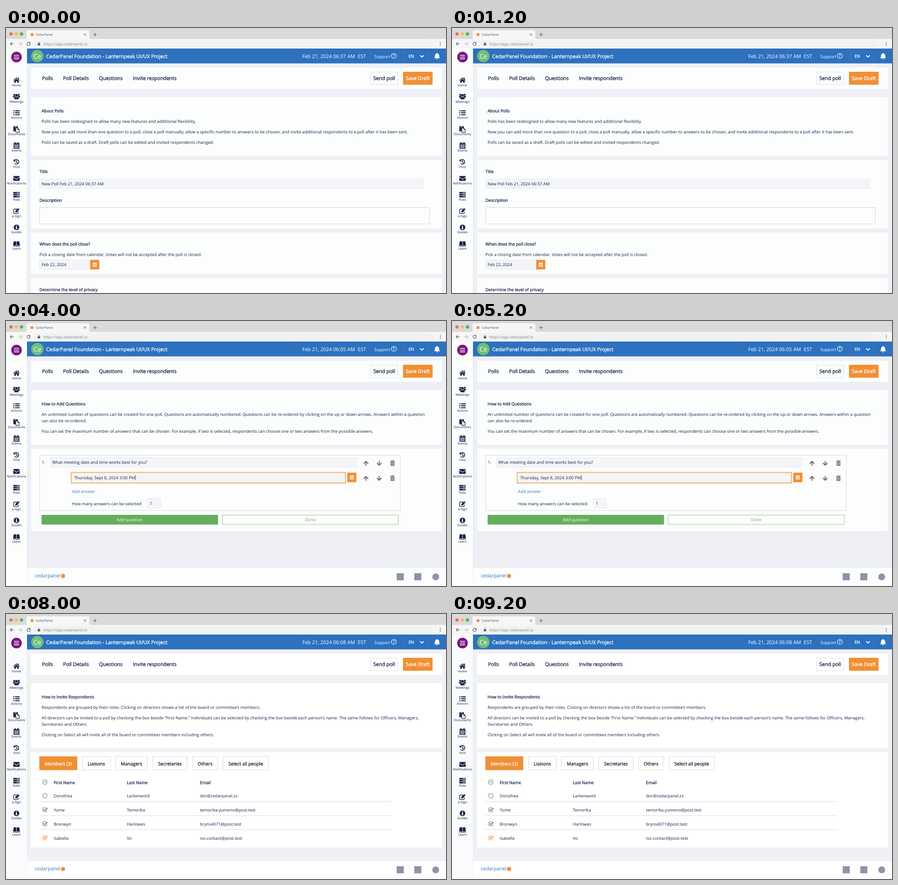
Recreate the animation shown at these times as an HTML page. Size 964 px wide and 581 px high, loop 10 s.

```html
<!DOCTYPE html>
<html lang="en">
<head>
<meta charset="utf-8">
<title>Poll builder</title>
<style>
  html, body { margin: 0; width: 100%; height: 100%; overflow: hidden; background: #f0f1f6; }
  svg { display: block; width: 100%; height: 100%; }
  text { font-family: "Open Sans", "Noto Sans", sans-serif; text-rendering: geometricPrecision; }
</style>
</head>
<body>
<svg id="stage" viewBox="0 0 964 581" xmlns="http://www.w3.org/2000/svg"></svg>
<script>
const NAVY = '#152048', ORANGE = '#f18f34', GREEN = '#66ae5c', BLUE = '#2d71bf', GRAY = '#6a6c70';
const BODY = 9.2, NAV = 11.02, TAB = 10.09, SMALL = 7.06;
const SCENE_MS = 2000;

// y is the middle of the capital letters
const text = (x, y, str, { size = BODY, fill = NAVY, bold = false, anchor = 'start' } = {}) =>
  `<text x="${x}" y="${y + size * 0.357}" font-size="${size}" fill="${fill}" text-anchor="${anchor}"` +
  (bold ? ` stroke="${fill}" stroke-width="${size * 0.032}"` : '') + `>${str}</text>`;
const rect = (x1, y1, x2, y2, fill, stroke, width = 1, r = 0) =>
  `<rect x="${x1}" y="${y1}" width="${x2 - x1}" height="${y2 - y1}" rx="${r}" fill="${fill}"` +
  (stroke ? ` stroke="${stroke}" stroke-width="${width}"` : '') + '/>';
const circle = (x, y, r, fill, stroke = 'none', width = 1) =>
  `<circle cx="${x}" cy="${y}" r="${r}" fill="${fill}" stroke="${stroke}" stroke-width="${width}"/>`;
const shape = (d, fill) => `<path d="${d}" fill="${fill}"/>`;
const line = (d, stroke, width = 1) =>
  `<path d="${d}" fill="none" stroke="${stroke}" stroke-width="${width}" stroke-linecap="round" stroke-linejoin="round"/>`;
const at = (x, y, content, scale = 1) => `<g transform="translate(${x} ${y}) scale(${scale})">${content}</g>`;

const calendar = (fg, bg) =>
  rect(-6.5, -5.3, 6.5, 7, fg, null, 0, 1) + line('M-3.3-7V-4M3.3-7V-4', fg, 2) +
  line('M-5.5-1.7H5.5M-5.5 1.2H5.5M-5.5 4H5.5M-2.7-1.7V6M0-1.7V6M2.7-1.7V6', bg, 0.8);

function sideIcons(bg) {
  const c = NAVY;
  return {
    'Home': shape('M-7.2 .2 0-6 7.2 .2 6.2 1.4 0-3.9-6.2 1.4ZM-4.9 1.3 0-2.8 4.9 1.3V5.8H1.4V2.2H-1.4V5.8H-4.9ZM3.2-5.5H5.1V-1.8L3.2-3.4Z', c),
    'Meetings': circle(-5, -3.8, 2, c) + circle(5, -3.8, 2, c) + circle(0, -2.4, 2.9, c) +
      shape('M-7.7 2.2V.6Q-7.7-1.5-5.8-1.5H-3.7Q-3.3.2-2.2.9-3.9 1.2-4.4 2.2ZM7.7 2.2V.6Q7.7-1.5 5.8-1.5H3.7Q3.3.2 2.2.9 3.9 1.2 4.4 2.2ZM-4.7 6.2V4Q-4.7 1.1-2.2 1.1 0 2.5 2.2 1.1 4.7 1.1 4.7 4V6.2Z', c),
    'Actions': shape([-5.4, -1.1, 3.2].map(y => `M-7 ${y}h2.5v2.2h-2.5zM-3 ${y}h10v2.2h-10z`).join(''), c),
    'Documents': rect(-6.8, -6.5, 3, 4.8, c, null, 0, 1) + line('M-4-5H0', bg) +
      shape('M-2.2-2.8H3L6.6.8V7H-2.2Z', bg) + line('M-1.5-2.1H2.8L6.2 1.2V6.8H-1.5ZM2.8-2V1.2H6', c, 1.1),
    'Events': calendar(c, bg),
    'Find': line('M-4.2-3.6A5.2 5.2 0 1 1-3.8 3.9M0-2.6V.5L2.1 1.7', c, 1.7) + shape('M-6.4-6V-1H-1.4Z', c),
    'Notifications': rect(-7, -5, 7, 5.6, c, null, 0, 1) + line('M-7-2.6-1.2 1.5Q0 2.3 1.2 1.5L7-2.6', bg, 1.1),
    'Polls': [-5.8, -1.5, 2.8].map(y => rect(-7, y, 7, y + 3.3, c, null, 0, 0.6) +
      line(`M1 ${y + 1.65}H5.5`, bg, 0.9)).join(''),
    'e-Sign': line('M2.5-4.2H-5Q-6.2-4.2-6.2-3V4.3Q-6.2 5.5-5 5.5H2.6Q3.8 5.5 3.8 4.3V2', c, 1.4) +
      shape('M-2.6 3V.1L3.9-6.2 6.8-3.4.4 3Z', c) + line('M2.3-4.5 5.1-1.7', bg, 0.7),
    'Guides': circle(0, 0, 6.1, c) + circle(0, -3.1, 1.2, bg) + shape('M-1.7-1.2H1.1V2.5H1.9V4H-1.9V2.5H-1.1V.3H-1.7Z', bg),
    'Learn': shape('M-7.5 4.3-6-5.2Q-2-6-.5-4.6V4.4Q-3 3.3-7.5 4.3ZM.5-4.6Q2-6 6-5.2L7.5 4.3Q3 3.3.5 4.4ZM-7.5 5H7.5V6H1.3L0 6.6-1.3 6H-7.5Z', c),
  };
}

function sidebar(bg) {
  const items = Object.entries(sideIcons(bg)).map(([label, icon], i) =>
    at(23, 114.2 + 35.87 * i, icon) +
    text(23, 125.2 + 35.85 * i, label, { size: SMALL, anchor: 'middle' })).join('');
  return rect(0, 45, 46, 581, bg) + rect(46, 77, 48, 581, 'rgba(0,0,40,.03)') +
    circle(23, 63.7, 11.6, '#77157f') + line('M18 60H28M18 63.8H28M18 67.6H28', '#fff', 1.6) + items;
}

function browser() {
  const ink = '#4b4e52';
  return rect(0, 0, 964, 25, '#dadada') + rect(0, 24, 964, 45, '#f6f6f6') +
    circle(11, 13, 3.6, '#ee6a5f') + circle(22.5, 13, 3.6, '#f4be4f') + circle(34, 13, 3.6, '#43b94c') +
    shape('M41 24.5Q45 24.5 45 20.5V9Q45 5 49 5H178.5Q182.5 5 182.5 9V20.5Q182.5 24.5 186.5 24.5Z', '#f6f6f6') +
    circle(57, 14.5, 3.2, ORANGE) + text(65, 14.5, 'CedarPanel', { size: 7, fill: ink }) +
    line('M171 12.4l4 4m0-4l-4 4M191.5 14.5h7m-3.5-3.5v7', ink) +
    rect(61, 27, 936, 42.5, '#f1f2f3', null, 0, 7.7) +
    line('M16.5 34.7H9.5M12.5 31.5l-3.2 3.2 3.2 3.2', ink, 1.1) +
    line('M27.5 34.7h7M31.5 31.5l3.2 3.2-3.2 3.2', '#b4b6b8', 1.1) +
    line('M52.3 32.5A3.5 3.5 0 1 0 53 35.3', ink, 1.1) + shape('M53.4 30.7v3.5h-3.5z', ink) +
    rect(69.7, 33.7, 74.7, 38, ink, null, 0, 0.6) + line('M70.8 34v-1.3a1.4 1.4 0 0 1 2.8 0V34', ink, 0.8) +
    text(81.8, 34.6, 'https://app.cedarpanel.zz', { size: 8.15, fill: '#7b7e82' }) +
    [31.5, 34.7, 37.9].map(y => circle(951.5, y, 0.9, ink)).join('');
}

function header(clock) {
  const white = { fill: '#fff' };
  return rect(46, 45, 964, 77.5, BLUE) + rect(46, 77.5, 964, 79, 'rgba(20,40,90,.06)') +
    circle(68.6, 61.5, 13.6, '#70be78') + text(68.6, 61.7, 'Ce', { ...white, size: 14.2, anchor: 'middle' }) +
    text(88, 61.8, 'CedarPanel Foundation - Lanternpeak UI/UX Project', { ...white, size: NAV, bold: true }) +
    text(649, 61.8, `Feb 21, 2024 ${clock} AM`, { ...white, size: NAV }) +
    text(770.5, 61.8, 'EST', { ...white, size: NAV }) +
    text(807, 62.3, 'Support', white) + circle(849.8, 61, 5.5, 'none', '#fff', 1.2) +
    text(849.8, 61, '?', { ...white, size: 9, bold: true, anchor: 'middle' }) +
    line('M873 53V71M925 53V71', 'rgba(255,255,255,.12)') +
    text(882, 62, 'EN', { ...white, bold: true }) + line('M907.8 60.5 911.2 63.9 914.6 60.5', '#fff', 2) +
    shape('M938 66.2Q940 64.5 940 60.5 940 56.8 943.5 56V55H945.5V56Q949 56.8 949 60.5 949 64.5 951 66.2ZM942.8 67H946.2A1.7 1.7 0 0 1 942.8 67Z', '#fff');
}

const navBar = panel => rect(55, 87, 955, 133.5, panel) +
  [[79, 'Polls'], [125, 'Poll Details'], [203.7, 'Questions'], [278, 'Invite respondents']]
    .map(([x, label]) => text(x, 110, label, { size: NAV, bold: true })).join('') +
  rect(799, 96.5, 858, 124, panel, '#dcdee4') + text(828.6, 110.5, 'Send poll', { size: NAV, bold: true, anchor: 'middle' }) +
  rect(869.8, 96, 934.6, 124.4, ORANGE) + text(902.2, 110.5, 'Save Draft', { size: NAV, fill: '#fff', bold: true, anchor: 'middle' });

const footer = panel => rect(46, 541, 964, 581, panel) + rect(46, 540.5, 964, 541.5, 'rgba(0,0,40,.03)') +
  text(63, 558.3, 'cedarpanel', { size: 10.8, fill: '#2f78c0' }) + circle(125, 559, 4.5, ORANGE) +
  rect(856, 553, 871.5, 568.5, '#8c94aa') + rect(894.5, 553, 910, 568.5, '#8c94aa') + circle(941.5, 561, 7.5, '#8c94aa');

const field = (x1, y1, x2, y2, str, pad = 5) =>
  rect(x1 + 0.5, y1 + 0.5, x2 - 0.5, y2 - 0.5, '#f4f5f8', '#e5e7ec') + text(x1 + pad, (y1 + y2) / 2, str);
const dateButton = (x, y) => rect(x, y, x + 20, y + 21, ORANGE) + at(x + 10, y + 10.5, calendar('#fff', ORANGE), 0.66);

// Lead panel: a bold heading followed by [y, text] lines
const intro = (panel, bottom, title, lines) => rect(55, 151.5, 955, bottom, panel) +
  text(78, 181.8, title, { bold: true }) + lines.map(([y, str]) => text(78, y, str)).join('');

const questionButtons = (y, panel) =>
  rect(78, y, 464.5, y + 21.3, GREEN) + text(271, y + 11, 'Add question', { fill: '#fff', anchor: 'middle' }) +
  rect(473.8, y + 0.4, 859.7, y + 20.9, panel, '#85be7d', 0.9) + text(666.7, y + 11, 'Done', { fill: GREEN, anchor: 'middle' });

const questionIntro = panel => intro(panel, 271.3, 'How to Add Questions', [
  [204.7, 'An unlimited number of questions can be created for one poll. Questions are automatically numbered. Questions can be re-ordered by clicking on the up or down arrows. Answers within a question'],
  [218.5, 'can also be re-ordered.'],
  [241.5, 'You can set the maximum number of answers that can be chosen. For example, if two is selected, respondents can choose one or two answers from the possible answers.'],
]);

const inviteIntro = panel => intro(panel, 294, 'How to Invite Respondents', [
  [204.7, 'Respondents are grouped by their roles. Clicking on directors shows a list of the board or committee’s members.'],
  [227.5, 'All directors can be invited to a poll by checking the box beside “First Name.” Individuals can be selected by checking the box beside each person’s name. The same follows for Officers, Managers,'],
  [241.3, 'Secretaries and Others.'],
  [264.5, 'Clicking on Select all will invite all of the board or committees members including others.'],
]);

function details(panel) {
  return intro(panel, 280.3, 'About Polls', [
    [204.7, 'Polls has been redesigned to allow many new features and additional flexibility.'],
    [227.7, 'Now you can add more than one question to a poll, close a poll manually, allow a specific number to answers to be chosen, and invite additional respondents to a poll after it has been sent.'],
    [250.7, 'Polls can be saved as a draft. Draft polls can be edited and invited respondents changed.'],
  ]) +
    rect(55, 289, 955, 439.5, panel) + text(73.3, 314.8, 'Title', { bold: true }) +
    field(73, 330.7, 915, 351.8, 'New Poll Feb 21, 2024 06:37 AM') +
    text(73.3, 377.4, 'Description', { bold: true }) + rect(73.5, 393.5, 927.5, 429.7, panel, '#d3d5da') +
    rect(55, 448.3, 955, 539, panel) + text(73.3, 473.8, 'When does the poll close?', { bold: true }) +
    text(73.3, 496.7, 'Pick a closing date from calendar. Votes will not be accepted after the poll is closed.') +
    field(73, 508, 185, 529.5, 'Feb 22, 2024') + dateButton(184.5, 508.3) +
    rect(55, 548, 955, 581, panel) + text(73.3, 573.3, 'Determine the level of privacy', { bold: true });
}

const emptyQuestions = panel => questionIntro(panel) + rect(55, 280, 955, 330, panel) +
  questionButtons(294, panel) + footer(panel);

function rowTools(y, panel) {
  const arrow = 'M0 4.5V-4M-4.4 .2 0-4.2 4.4 .2';
  const trash = rect(-4.2, -3, 4.2, 6, GRAY, null, 0, 1) + line('M-4.7-4.3H4.7M-1.4-5.4H1.4', GRAY, 1.2) +
    line('M-2-.9V4M0-.9V4M2-.9V4', panel, 0.8);
  return at(788.7, y, line(arrow, GRAY, 2.1)) + at(817.6, y, line(arrow, GRAY, 2.1), '1 -1') + at(846.7, y - 0.6, trash);
}

function questionForm(panel) {
  return questionIntro(panel) + rect(55, 280, 955, 460.5, panel) +
    rect(73.5, 294.5, 864, 415.5, panel, '#d6d8dc') + text(78.5, 310.2, '1.') +
    field(97, 299.6, 768, 320.6, 'What meeting date and time works best for you?', 4.3) + rowTools(312, panel) +
    rect(143, 332, 744, 355.2, '#f3f5f6', 'rgba(241,143,52,.25)', 3, 1) +
    rect(143, 332, 744, 355.2, 'none', '#f4ad5b', 1.4) +
    text(149.5, 343.6, 'Thursday, Sept 8, 2024 3:00 PM') + rect(283.4, 338, 284.2, 349.3, '#222') +
    dateButton(747.7, 332.5) + rowTools(345, panel) +
    text(144.5, 373.5, 'Add answer', { fill: '#2f7fc6' }) +
    text(144.5, 400.3, 'How many answers can be selected') + field(309, 389.4, 339, 410.6, '1', 6) +
    questionButtons(425, panel) + footer(panel);
}

function roleTabs(panel, selected) {
  const tabs = [['Members', 68.8], ['Liaisons', 61.5], ['Managers', 70.5], ['Secretaries', 76], ['Others', 56], ['Select all people', 100]];
  let x = 73;
  return tabs.map(([label, width], i) => {
    const active = selected && i === 0, w = active ? 83.2 : width;
    const tab = rect(x + 0.4, 312.6, x + w - 0.4, 341.9, active ? ORANGE : panel, active ? ORANGE : '#d2d4d8', 0.9) +
      text(x + w / 2, 328, active ? `${label} (${selected})` : label,
        { size: TAB, fill: active ? '#fff' : '#161d33', bold: true, anchor: 'middle' });
    x += w + 11;
    return tab;
  }).join('');
}

const roles = panel => inviteIntro(panel) + rect(55, 303, 955, 351.5, panel) + roleTabs(panel, 0) + footer(panel);

function checkbox(y, state, color = GRAY) {
  if (state === 'on') {
    return at(85.2, y, line('M2.3-4.4H-3Q-4.5-4.4-4.5-3V3Q-4.5 4.4-3 4.4H2.7Q4.2 4.4 4.2 3V1.6', color) +
      line('M-2.2-.6 0 1.6 5.2-3.5', color, 1.8));
  }
  return rect(80.7, y - 4.5, 89.7, y + 4.5, 'none', color, 1, 1.5) +
    (state === 'some' ? line(`M83 ${y}h4.5`, color) : '');
}

function memberTable(panel) {
  const people = [
    ['Dorothea', 'Larkenwold', 'dor@cedarpanel.zz'],
    ['Yume', 'Temorika', 'temorika.yumeno@post.test'],
    ['Bronwyn', 'Harlowes', 'bryns4071@post.test'],
    ['Isabella', 'Vo', 'ivo.contact@post.test'],
  ];
  const cells = (y, row, bold) => row.map((str, i) => text(104.5 + 160.3 * i, y, str, { bold })).join('');
  const rows = people.map((person, i) => {
    const y = 399 + 30.75 * i;
    return checkbox(y - 0.5, i ? 'on' : 'off', i === 3 ? ORANGE : GRAY) + cells(y, person) +
      (i < 3 ? rect(73.2, y + 11.8, 845, y + 12.7, '#d4d6da') : '');
  }).join('');
  return inviteIntro(panel) + rect(55, 303, 955, 512, panel) + roleTabs(panel, 3) +
    checkbox(368.5, 'some') + cells(369.8, ['First Name', 'Last Name', 'Email'], true) + rows + footer(panel);
}

const scenes = [
  { clock: '06:37', panel: '#fcfdfd', back: '#eff0f5', side: '#fcfdfd', content: details },
  { clock: '06:39', panel: '#f8f8f9', back: '#eff1f6', side: '#f8f8f9', content: emptyQuestions },
  { clock: '06:05', panel: '#fcfdfd', back: '#eeeff5', side: '#fcfdfd', content: questionForm },
  { clock: '06:08', panel: '#f9fafc', back: '#eff1f5', side: '#f9fafc', content: roles },
  { clock: '06:08', panel: '#ffffff', back: '#f0f1f5', side: '#fafbfd', content: memberTable },
];

const stage = document.getElementById('stage');
stage.innerHTML = browser() + scenes.map(s =>
  `<g display="none">${rect(46, 77, 964, 581, s.back)}${navBar(s.panel)}${s.content(s.panel)}${header(s.clock)}${sidebar(s.side)}</g>`).join('');
const groups = [...stage.children].slice(-scenes.length);

const start = performance.now();
function draw(now) {
  const current = Math.floor(Math.max(0, now - start) / SCENE_MS) % scenes.length;
  groups.forEach((g, i) => g.setAttribute('display', i === current ? 'inline' : 'none'));
  requestAnimationFrame(draw);
}
draw(start);
</script>
</body>
</html>
```
